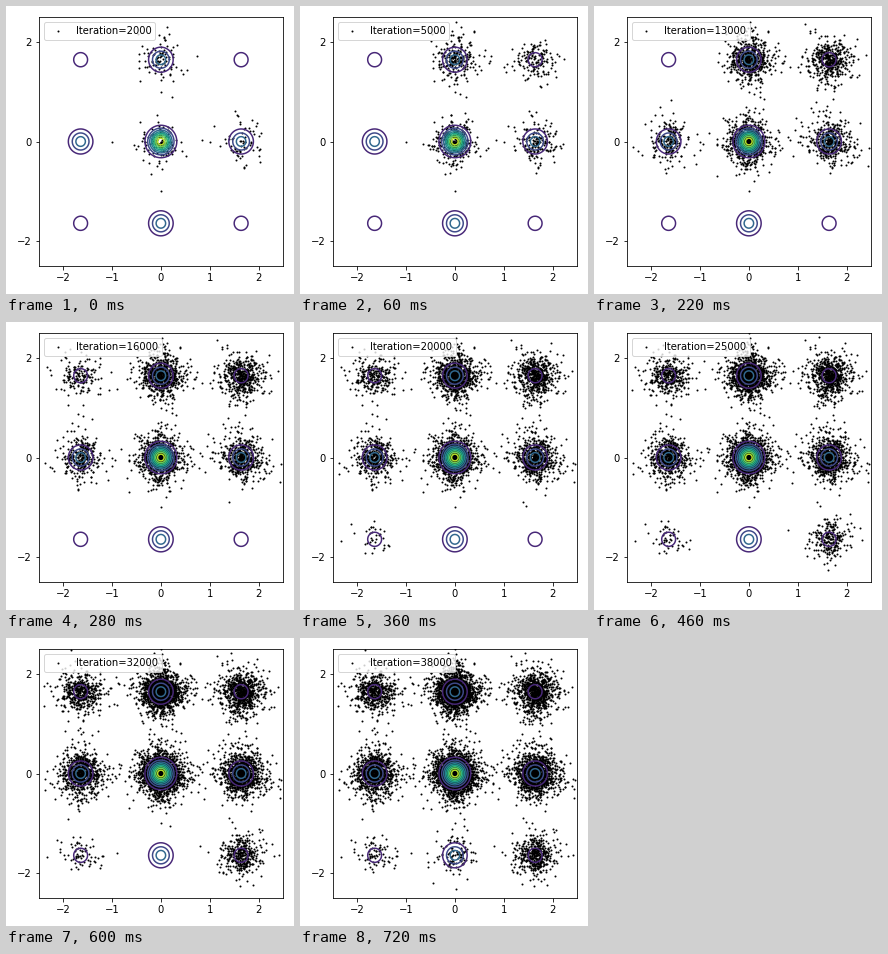
A matplotlib script that plays this animation: 288 by 288 pixels, repeating every 740 ms.

```python
import numpy as np
import matplotlib.pyplot as plt
from matplotlib.animation import FuncAnimation

STEPS = 37
LAST = STEPS - 1
MODE = 1.64

# column, row, step of discovery, samples collected by the last step
MODES = [
    (0, 0, -2, 2400), (0, 1, -2, 1800), (1, 0, -2, 1250),
    (1, 1, 2, 850), (-1, 0, 5, 1000), (-1, 1, 12, 520),
    (-1, -1, 14, 80), (1, -1, 18, 440), (0, -1, 31, 110),
]


def sample_chain():
    """All sample positions with the step at which each one appears."""
    rng = np.random.default_rng(7)
    points = [[(0, 0), (0, 1), (0, -1), (1, 0), (-1, 0)]]
    births = [np.zeros(5)]
    for col, row, start, total in MODES:
        points.append(MODE * np.array([col, row])
                      + 0.19 * rng.standard_t(8, size=(total, 2)))
        # corners fill quickly at first, the others at a steady rate
        power = 2 if col * row else 1
        share = (np.arange(total) + 1) / total
        births.append(start + (LAST - start) * share ** power)
    return np.concatenate(points), np.concatenate(births)


def profile(t):
    """One axis of the separable three-by-three mixture."""
    bump = lambda m, w: w * np.exp(-(t - m) ** 2 / 0.0486)
    return bump(0, 2.966) + bump(MODE, 1.23) + bump(-MODE, 1.23)


points, births = sample_chain()

fig, ax = plt.subplots(figsize=(4, 4), dpi=72)
grid = np.linspace(-2.5, 2.5, 251)
density = np.outer(profile(grid), profile(grid))
ax.contour(grid, grid, density, levels=range(1, 9), vmin=0, vmax=9,
           cmap="viridis", zorder=2)
dots = ax.scatter([], [], s=1, c="black", label="Iteration=2000", zorder=1)
ax.set(xlim=(-2.5, 2.5), ylim=(-2.5, 2.5),
       xticks=range(-2, 3), yticks=[-2, 0, 2])
label = ax.legend(loc="upper left").get_texts()[0]
fig.tight_layout()


def draw(step):
    dots.set_offsets(points[births <= step])
    label.set_text(f"Iteration={2000 + 1000 * step}")
    return dots, label


anim = FuncAnimation(fig, draw, frames=STEPS, interval=20, repeat=True, repeat_delay=0)
plt.show()
```
